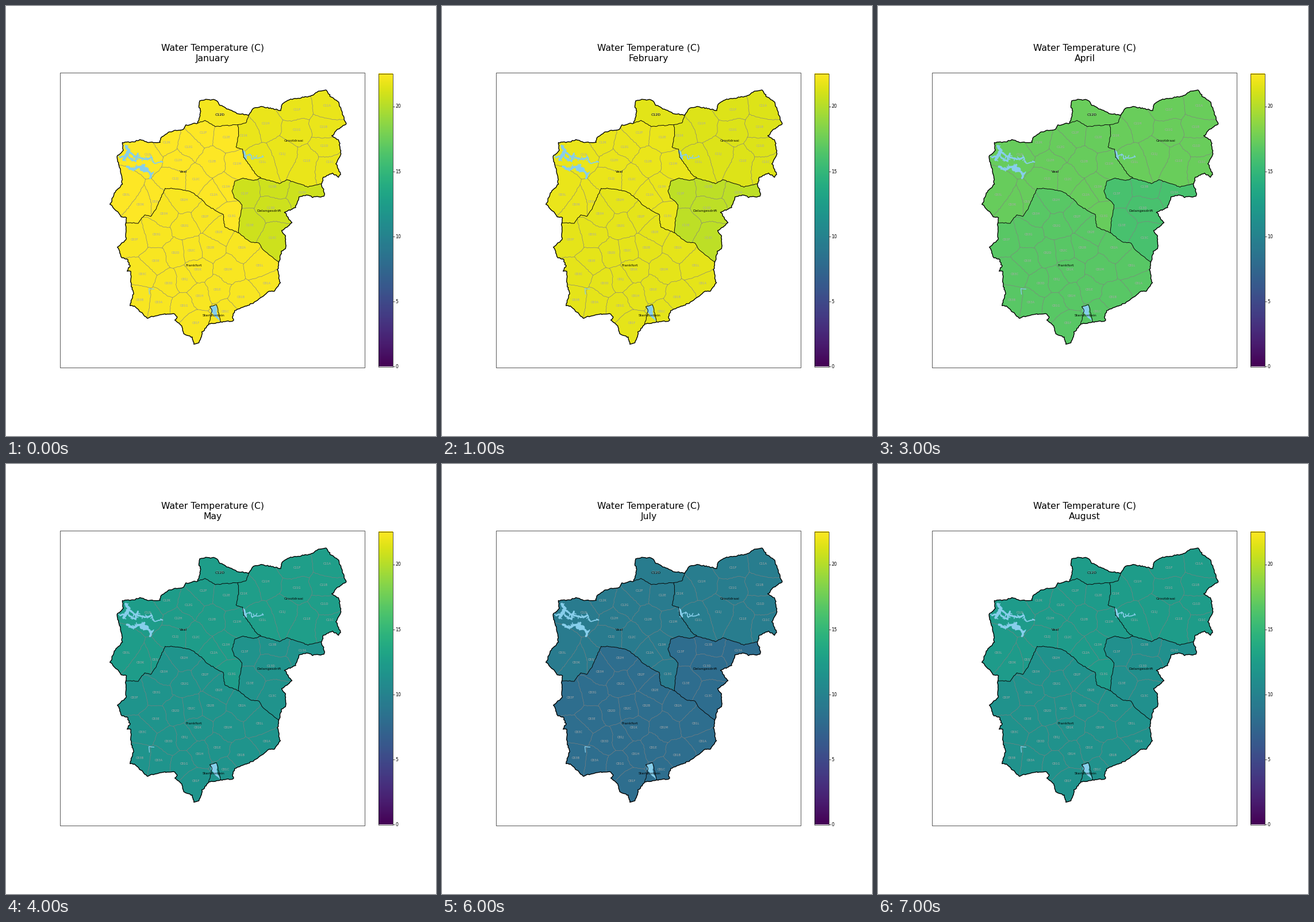
Recreate the animation shown at these times as a matplotlib script. Size 748 by 748 pixels, loop 8000 ms.

```python
from itertools import combinations

import numpy as np
import matplotlib.pyplot as plt
from matplotlib.animation import FuncAnimation
from matplotlib.colors import Normalize
from matplotlib.patches import Polygon, Rectangle
from matplotlib.path import Path

SIZE, DPI = 748, 68
PT = 72 / DPI  # points per pixel
LAKE = "skyblue"
TOP = 22.52

MONTHS = ["January", "February", "March", "April", "May", "June", "July", "August"]
vaal_t = np.array([22.5, 21.8, 20.25, 17.3, 12.4, 9.3, 9.3, 12.25])
groot_t = np.array([21.75, 21.3, 20.15, 17.4, 12.55, 9.45, 9.45, 12.4])
del_t = np.array([20.8, 20.3, 19.1, 15.95, 11.55, 8, 8, 11.25])
frank_t = np.array([22.3, 21.6, 20.15, 16.65, 11.65, 8.05, 8.05, 11.35])
TEMPS = {
    "Vaal": vaal_t, "C12D": (vaal_t + groot_t) / 2, "Grootdraai": groot_t,
    "Delangesdrift": del_t, "Frankfort": frank_t, "Sterkfontein": frank_t,
}
NAME_AT = {
    "Vaal": (308, 287.5), "C12D": (372, 188), "Grootdraai": (500, 233),
    "Delangesdrift": (457, 355.5), "Frankfort": (326, 450), "Sterkfontein": (361, 537.5),
}

# Arcs of the outer outline, clockwise
NORTHWEST = [(202, 237), (222, 236), (233, 231), (243, 236), (267, 237), (268, 229),
             (284, 218), (308, 214), (313, 207), (333, 203)]
NORTH = [(333, 203), (339, 183), (335, 173), (337, 165), (345, 162), (365, 163),
         (372, 172), (401, 186), (422, 189)]
NORTHEAST = [(422, 189), (427, 179), (442, 174), (477, 181), (480, 169), (489, 163),
             (531, 156), (543, 147), (557, 146), (565, 158), (577, 165), (591, 205),
             (573, 217), (567, 225), (579, 234), (582, 257), (574, 274), (581, 292),
             (578, 297), (567, 290), (552, 298), (548, 309)]
EAST = [(548, 309), (554, 327), (552, 331), (533, 332), (525, 328), (509, 332),
        (503, 350), (484, 358), (497, 377), (479, 391), (485, 400), (487, 419),
        (479, 427), (474, 445)]
SOUTHEAST = [(474, 445), (472, 458), (476, 481), (467, 495), (457, 496), (430, 516),
             (397, 530), (393, 541), (396, 547), (373, 549)]
SOUTH = [(373, 549), (352, 553)]
SOUTHWEST = [(352, 553), (341, 567), (335, 586), (327, 588), (324, 576), (309, 570),
             (306, 558), (294, 546), (298, 541), (293, 535), (268, 536), (245, 542),
             (225, 523), (216, 520), (221, 500), (216, 477), (217, 461), (211, 460),
             (215, 451), (210, 440), (201, 437), (194, 419), (208, 406), (208, 377)]
WEST = [(208, 377), (209, 368), (200, 366), (181, 344), (188, 325), (202, 309),
        (199, 285), (192, 262), (203, 250), (202, 237)]

# Borders between regions
VAAL_C12D = [(333, 203), (346, 199), (363, 209), (403, 206)]
GROOT_C12D = [(403, 206), (417, 203), (422, 189)]
VAAL_GROOT = [(403, 206), (404, 226), (400, 245), (411, 249), (413, 262), (434, 292),
              (443, 299)]
GROOT_DEL = [(443, 299), (475, 308), (488, 302), (525, 314), (548, 309)]
VAAL_DEL = [(443, 299), (430, 303), (410, 299), (398, 304), (393, 321), (397, 333),
            (410, 345), (405, 375), (404, 394)]
DEL_FRANK = [(404, 394), (424, 410), (440, 412), (447, 424), (474, 445)]
VAAL_FRANK = [(404, 394), (380, 384), (377, 362), (348, 346), (341, 337), (321, 322),
              (292, 317), (276, 317), (262, 350), (251, 365), (241, 363), (229, 377),
              (208, 377)]
STERK_FRANK = [(352, 553), (358, 529), (354, 522), (366, 519), (373, 549)]

# Centres of the small catchments
CODES = {
    "C11": dict(A=(558, 173), B=(552, 210), C=(563, 271), D=(554, 243), E=(523, 269),
                F=(506, 180), G=(506, 215), H=(451, 204), J=(480, 257), K=(413, 225),
                L=(446, 271)),
    "C12": dict(A=(361, 328), B=(358, 270), C=(330, 301), D=(372, 188), E=(383, 228),
                F=(343, 220), G=(318, 245), H=(299, 268), J=(294, 300), K=(279, 237),
                L=(247, 258)),
    "C13": dict(A=(515, 324), B=(463, 314), C=(463, 403), D=(461, 351), E=(424, 381),
                F=(415, 326), G=(393, 365), H=(383, 314)),
    "C81": dict(A=(453, 482), B=(408, 506), C=(381, 531), E=(367, 493), F=(330, 551),
                G=(310, 521), H=(336, 504), J=(310, 475), K=(333, 458), L=(441, 451),
                M=(386, 458)),
    "C82": dict(A=(410, 420), B=(355, 420), C=(322, 425), D=(295, 429), E=(370, 393),
                F=(346, 366), G=(311, 382), H=(309, 337)),
    "C83": dict(A=(265, 515), B=(232, 511), C=(237, 466), D=(283, 482), E=(260, 443),
                F=(223, 406), G=(262, 397), H=(275, 361), J=(259, 340), K=(233, 345),
                L=(209, 328)),
}
CODES["C11"]["M"] = (402, 274)

# Lake arms: width, number of twigs, path
LAKE_ARMS = [
    (4.5, 8, [(208, 243), (213, 251), (204, 267)]),
    (3, 4, [(198, 263), (212, 259)]),
    (3, 10, [(212, 252), (222, 260), (243, 266), (253, 263)]),
    (1.8, 4, [(253, 263), (257, 273), (272, 271)]),
    (3, 7, [(213, 262), (224, 269), (229, 256)]),
    (4, 7, [(210, 279), (219, 284), (240, 276)]),
    (8, 4, [(236, 283), (244, 284)]),
    (3.5, 4, [(244, 286), (253, 292), (250, 299)]),
    (3.5, 2, [(412, 252), (417, 265)]),
    (1.6, 6, [(414, 263), (424, 258), (428, 265), (447, 262)]),
    (1.3, 0, [(257, 492), (248, 491), (249, 501)]),
]
STERK_LAKE = [(356, 522), (367, 520), (366, 536), (372, 548), (365, 542), (356, 531)]

rng = np.random.default_rng(12)


def rough(points, amp=0.8, step=2.6):
    """Break a path into short jagged steps, keeping its ends."""
    out = []
    for a, b in zip(np.array(points[:-1], float), np.array(points[1:], float)):
        n = max(1, round(np.hypot(*(b - a)) / step))
        out += [a + (b - a) * k / n for k in range(n)]
    path = np.array(out + [points[-1]], float)
    path[1:-1] += rng.uniform(-amp, amp, (len(path) - 2, 2))
    return path


def cell_borders(sites):
    """Edges halfway between neighbouring sites (Voronoi)."""
    for i, j in combinations(range(len(sites)), 2):
        a, b = sites[i], sites[j]
        mid, along = (a + b) / 2, np.array([a[1] - b[1], b[0] - a[0]])
        along = along / np.hypot(*along)
        lo, hi = -90, 90
        for k, c in enumerate(sites):
            if k in (i, j):
                continue
            slope = 2 * along @ (c - a)
            room = c @ c - a @ a - 2 * mid @ (c - a)
            if slope > 0:
                hi = min(hi, room / slope)
            elif slope < 0:
                lo = max(lo, room / slope)
            elif room < 0:
                hi = lo
        if hi > lo:
            yield mid + lo * along, mid + hi * along


outer = [rough(p, 0.9) for p in (NORTHWEST, NORTH, NORTHEAST, EAST,
                                 SOUTHEAST, SOUTH, SOUTHWEST, WEST)]
nw, n, ne, e, se, s, sw, w = outer
inner = [rough(p, 0.7) for p in (VAAL_C12D, GROOT_C12D, VAAL_GROOT, GROOT_DEL,
                                 VAAL_DEL, DEL_FRANK, VAAL_FRANK, STERK_FRANK)]
v_c, g_c, v_g, g_d, v_d, d_f, v_f, s_f = inner
rings = {
    "Vaal": [nw, v_c, v_g, v_d, v_f, w],
    "C12D": [n, g_c[::-1], v_c[::-1]],
    "Grootdraai": [g_c, ne, g_d[::-1], v_g[::-1]],
    "Delangesdrift": [g_d, e, d_f[::-1], v_d[::-1]],
    "Frankfort": [d_f, se, s_f[::-1], sw, v_f[::-1]],
    "Sterkfontein": [s, s_f],
}

fig = plt.figure(figsize=(11, 11), dpi=DPI, facecolor="white")
ax = fig.add_axes([0, 0, 1, 1])
ax.axis("off")
cmap = plt.get_cmap("viridis")
norm = Normalize(0, TOP)


def stroke(path, color, width, z, join="round"):
    return ax.plot(path[:, 0], path[:, 1], color=color, lw=width * PT, zorder=z,
                   solid_joinstyle=join, solid_capstyle="round")[0]


def label(x, y, text, size, color="black", ha="center"):
    return ax.text(x, y + 0.36 * size, text, fontsize=size * PT, color=color, ha=ha,
                   va="baseline", family="DejaVu Sans", zorder=8)


def box(x0, y0, x1, y1):
    ax.add_patch(Rectangle((x0, y0), x1 - x0, y1 - y0, fill=False, ec="black",
                           lw=0.65 * PT, zorder=7))


# Map
spots = [(prefix + letter, np.array(at, float))
         for prefix, group in CODES.items() for letter, at in group.items()]
areas = {}
for name, arcs in rings.items():
    ring = np.vstack(arcs)
    areas[name] = ax.add_patch(Polygon(ring, lw=0, zorder=1))
    shape = Path(ring)
    sites = [at for _, at in spots if shape.contains_point(at)]
    for start, end in cell_borders(sites):
        path = rough([start, end], 0.7)
        t = np.linspace(0, 2 * np.pi, len(path))[:, None]
        normal = np.array([start[1] - end[1], end[0] - start[0]])
        path += normal * np.sin(t) * rng.uniform(-0.06, 0.06)
        stroke(path, "gray", 0.65, 2).set_clip_path(areas[name])
for path in inner:
    stroke(path, "black", 0.95, 4)
for path in outer:
    stroke(path, "black", 1.4, 5)

# Lakes
for width, twigs, arm in LAKE_ARMS:
    path = rough(arm, 1.1 if twigs else 0.3)
    stroke(path, LAKE, width, 3, "miter")
    for _ in range(twigs):
        start = path[rng.integers(len(path))]
        angle = rng.uniform(0, 2 * np.pi)
        end = start + rng.uniform(2.5, 5) * np.array([np.cos(angle), np.sin(angle)])
        stroke(np.array([start, end]), LAKE, 1.5, 3)
ax.add_patch(Polygon(rough(STERK_LAKE, 0.8), fc=LAKE, lw=0, zorder=3))

# Labels
for code, (x, y) in spots:
    label(x, y, code, 5.44, "darkgray")
for name, (x, y) in NAME_AT.items():
    label(x, y, name, 6.22)
label(359, 72, "Water Temperature (C)", 15.6)
month = label(359, 90, "", 15.6)

# Frame and colour bar
box(93.5, 115, 624, 628.5)
ax.imshow(np.linspace(1, 0, 256)[:, None], cmap=cmap, extent=(648, 673, 627, 117),
          aspect="auto", interpolation="nearest", zorder=6)
box(648, 117, 673, 627)
for value in range(0, 21, 5):
    y = 627 - 510 * value / TOP
    ax.plot([673, 675.7], [y, y], color="black", lw=0.65 * PT, zorder=7)
    label(677, y, str(value), 7.78, ha="left")

ax.set_xlim(-0.5, SIZE - 0.5)
ax.set_ylim(SIZE - 0.5, -0.5)


def update(i):
    month.set_text(MONTHS[i])
    for name, area in areas.items():
        area.set_facecolor(cmap(norm(TEMPS[name][i])))
    return [month, *areas.values()]


anim = FuncAnimation(fig, update, frames=len(MONTHS), interval=1000,
                     repeat=True, repeat_delay=0, blit=False)
plt.show()
```
